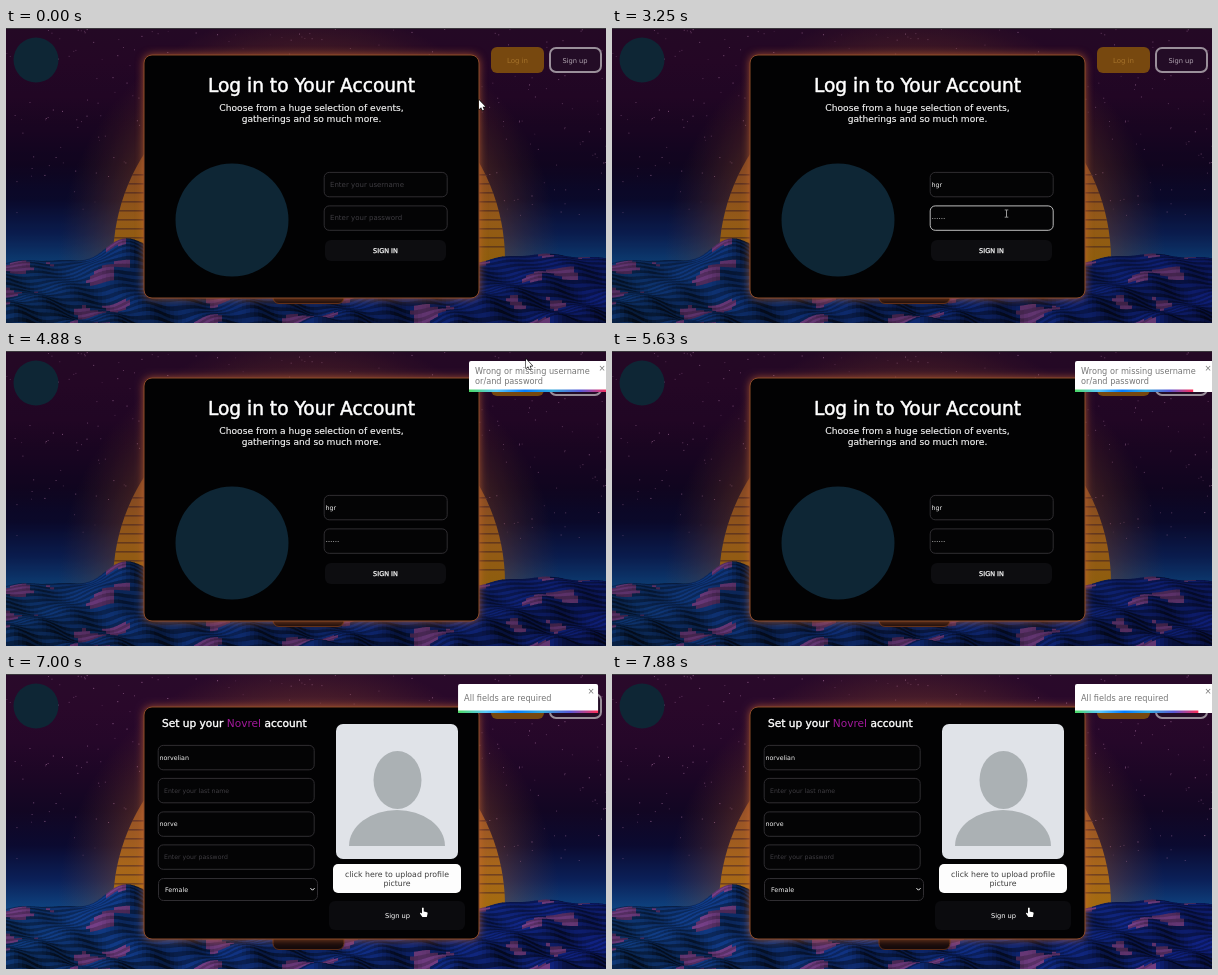
Write an HTML page with a canvas that moves like this. It is 600x295 px and loops after 8000 ms.

```html
<!DOCTYPE html>
<html lang="en">
<head>
<meta charset="utf-8">
<title>Log in and sign up</title>
<style>
html, body { margin: 0; width: 100%; height: 100%; overflow: hidden; background: #16081a; }
canvas { display: block; width: 600px; height: 295px; }
</style>
</head>
<body>
<canvas id="stage"></canvas>
<script>
const W = 600, H = 295, LOOP = 8000, STEP = 125;
const SIGNUP_AT = 5750;
const PX = 0.4375; // page zoom
const FONT = '"DejaVu Sans", sans-serif';
const LOGO = '#0e2635';
const dpr = window.devicePixelRatio || 1;

function makeLayer(canvas) {
  canvas.width = W * dpr;
  canvas.height = H * dpr;
  const context = canvas.getContext('2d');
  context.scale(dpr, dpr);
  return context;
}

const stage = document.getElementById('stage');
const ctx = makeLayer(stage);

function box(c, x, y, w, h, r, fill, stroke, line = 1) {
  c.beginPath();
  c.roundRect(x, y, w, h, r);
  if (fill) { c.fillStyle = fill; c.fill(); }
  if (stroke) { c.strokeStyle = stroke; c.lineWidth = line; c.stroke(); }
}

function disc(c, x, y, r, fill) {
  c.fillStyle = fill;
  c.beginPath();
  c.arc(x, y, r, 0, 7);
  c.fill();
}

// Draws text, thickened by `bold` pixels, and returns its width.
function text(str, x, y, size, color, align = 'left', bold = 0) {
  ctx.font = `${size}px ${FONT}`;
  ctx.fillStyle = ctx.strokeStyle = color;
  ctx.textAlign = align;
  ctx.fillText(str, x, y);
  if (bold) {
    ctx.lineWidth = bold;
    ctx.lineJoin = 'round';
    ctx.strokeText(str, x, y);
  }
  return ctx.measureText(str).width;
}

function gradient(c, x0, y0, x1, y1, colors) {
  const g = c.createLinearGradient(x0, y0, x1, y1);
  colors.forEach((color, i) => g.addColorStop(i / (colors.length - 1), color));
  return g;
}

function seeded(seed) {
  return () => (seed = (seed * 16807) % 2147483647) / 2147483647;
}

// --- Backdrop ---

const SUN = { x: 303, y: 232, r: 196 };

function drawSky(c) {
  c.fillStyle = gradient(c, 0, 0, 0, 240,
    ['#290a2a', '#29082a', '#250729', '#1c0625', '#120623', '#0b0a30', '#0b2058', '#0f4a88']);
  c.fillRect(0, 0, W, H);
  const rand = seeded(77);
  for (let i = 0; i < 330; i++) {
    const x = rand() * W, y = rand() * 195, a = 0.2 + rand() * 0.5;
    c.fillStyle = `rgba(190,130,180,${a})`;
    c.fillRect(x, y, 1, 1);
  }
}

function drawSun(c) {
  const { x, y, r } = SUN;
  const glow = c.createRadialGradient(x, y, r - 10, x, y, r + 55);
  glow.addColorStop(0, 'rgba(170,90,40,0.4)');
  glow.addColorStop(1, 'rgba(120,60,40,0)');
  c.fillStyle = glow;
  c.fillRect(0, 0, W, H);
  c.save();
  c.beginPath();
  c.arc(x, y, r, 0, 7);
  c.clip();
  c.fillStyle = gradient(c, 0, 36, 0, 245, ['#3a1c18', '#5c2f1c', '#965226', '#a8661a', '#a06c0c']);
  c.fillRect(x - r, 0, r * 2, H);
  c.fillStyle = 'rgba(50,22,40,0.45)';
  for (let i = 0; i < 9; i++) c.fillRect(x - r, 146 + i * 9, r * 2, 1.6);
  c.restore();
}

const hill = (x, center, width) => Math.exp(-(((x - center) / width) ** 2));

function ground(x, d) {
  const wave = Math.sin(x * 0.055 + d * 9) * 3 + Math.sin(x * 0.13 - d * 14) * 1.6 + Math.sin(x * 0.025 - d * 6) * 3;
  const ridge = 24 * hill(x, 122, 32) + 9 * hill(x, 535, 45);
  return 235 + 66 * d ** 1.25 - ridge * (1 - d) ** 2 - wave * (0.6 + d);
}

function drawTerrain(c) {
  const rows = 34, dx = 4;
  for (let j = 0; j < rows; j++) {
    const d = j / rows;
    for (let x = 0; x < W; x += dx) {
      const top = ground(x, d), next = ground(x + dx, d);
      const slope = Math.max(-1, Math.min(1, (next - top) / 1.6));
      const pink = Math.sin(x * 0.037 + d * 11) * Math.sin(x * 0.021 - d * 8 + 2) > 0.42 && slope < 0.1;
      const light = 20 - slope * 7 + (j % 2 ? 4 : -4) - d * 3;
      c.fillStyle = pink ? `hsl(285,36%,${light + 9}%)` : `hsl(${216 + x / 40},78%,${light}%)`;
      c.beginPath();
      c.moveTo(x, top);
      c.lineTo(x + dx + 0.5, next);
      c.lineTo(x + dx + 0.5, H);
      c.lineTo(x, H);
      c.fill();
    }
  }
}

function drawBackdrop(c) {
  drawSky(c);
  drawSun(c);
  drawTerrain(c);
  c.fillStyle = '#39353b';
  c.fillRect(0, 0, W, 1);
}

const backdrop = document.createElement('canvas');
drawBackdrop(makeLayer(backdrop));

// --- Page parts ---

function drawHeader() {
  disc(ctx, 30, 32, 22.5, LOGO);
  box(ctx, 485, 19, 53, 26, 6, '#77480f');
  text('Log in', 511.5, 34.5, 7, '#a5722a', 'center');
  box(ctx, 544, 20, 51, 24, 6, '#230c26', '#9a8f9a', 2);
  text('Sign up', 569, 34.5, 6.7, '#b0a4b0', 'center');
}

function drawCard(y, h) {
  box(ctx, 267, 255, 71, 20.5, 6, '#120809', '#5a2c16');
  ctx.save();
  ctx.shadowColor = 'rgba(215,108,48,0.75)';
  ctx.shadowBlur = 9 * dpr;
  box(ctx, 138, y, 335, h, 8, '#020203');
  ctx.restore();
  box(ctx, 138, y, 335, h, 8, null, '#8a4a28');
}

function field(x, y, w, hint, value, focused) {
  box(ctx, x + 0.2, y + 0.4, w, 24.4, 5, '#040405', focused ? '#bcbcbc' : '#2f2d31');
  if (value) text(value, x + 1.5, y + 14.5, 6.3, '#f2f2f2');
  else if (hint) text(hint.label, x + 6, y + 14.8, hint.size, '#3f3d42');
}

function typedCount(t, times) {
  return times.filter(at => t >= at).length;
}

function drawLogin(t) {
  ctx.fillStyle = 'rgba(0,0,0,0.12)';
  ctx.fillRect(0, 1, W, H);
  drawHeader();
  drawCard(27, 243);
  text('Log in to Your Account', 305.5, 64.3, 18.6, '#fff', 'center', 0.5);
  text('Choose from a huge selection of events,', 305.5, 83, 9.15, '#f4f4f4', 'center', 0.15);
  text('gatherings and so much more.', 305.5, 94, 9.1, '#f4f4f4', 'center', 0.15);
  disc(ctx, 226, 192, 56.5, LOGO);

  const name = 'hgr'.slice(0, typedCount(t, [1125, 1625, 1750]));
  const dots = typedCount(t, [2375, 2375, 2625, 2625, 2750, 3250]);
  const onName = t >= 625 && t < 2000;
  const onPass = t >= 2000 && t < 3750;
  field(318, 144, 123, { label: 'Enter your username', size: 7 }, name, onName);
  if (onName && name) {
    ctx.fillRect(320.5 + ctx.measureText(name).width, 153, 0.8, 7);
  }
  field(318, 177.5, 123, dots ? null : { label: 'Enter your password', size: 7 }, '', onPass);
  for (let i = 0; i < dots; i++) disc(ctx, 320.7 + i * 2.3, 190.5, 0.55, '#b0b0b0');

  box(ctx, 319, 212, 121, 21, 6, '#0d0d10');
  text('SIGN IN', 379.5, 225, 6.5, '#fff', 'center', 0.25);
}

function drawAvatar() {
  box(ctx, 330, 50, 122, 135, 7, '#e0e3e8');
  ctx.fillStyle = '#abb1b4';
  ctx.beginPath();
  ctx.ellipse(391.5, 106, 24, 29, 0, 0, 7);
  ctx.fill();
  ctx.beginPath();
  ctx.ellipse(391, 172, 48, 36, 0, Math.PI, 2 * Math.PI);
  ctx.fill();
}

function drawSignup() {
  drawHeader();
  drawCard(33, 232);
  let x = 156;
  x += text('Set up your ', x, 53, 10.6, '#fff', 'left', 0.4);
  x += text('Novrel', x, 53, 10.6, '#a3199c');
  text(' account', x, 53, 10.6, '#fff', 'left', 0.4);

  field(152, 71, 156, null, 'norvelian');
  field(152, 104, 156, { label: 'Enter your last name', size: 6.2 });
  field(152, 137.5, 156, null, 'norve');
  field(152, 170.5, 156, { label: 'Enter your password', size: 6.2 });
  box(ctx, 152.5, 204.5, 159, 22, 5, '#040405', '#2f2d31');
  text('Female', 159, 218, 6.4, '#f2f2f2');
  ctx.strokeStyle = '#fff';
  ctx.lineWidth = 1;
  ctx.beginPath();
  ctx.moveTo(304.5, 214.2);
  ctx.lineTo(306.5, 216.2);
  ctx.lineTo(308.5, 214.2);
  ctx.stroke();

  drawAvatar();
  box(ctx, 327, 190, 128, 29, 5, '#fdfdfd');
  text('click here to upload profile', 391, 202.5, 7.8, '#3c3c3c', 'center');
  text('picture', 391, 211.5, 7.8, '#3c3c3c', 'center');
  box(ctx, 323, 227, 136, 29, 6, '#0b0b0e');
  text('Sign up', 391.5, 243.5, 6.7, '#fff', 'center');
}

// --- Toast ---

const RAINBOW = ['#4cd964', '#5ac8fa', '#007aff', '#34aadc', '#5856d6', '#ff2d55'];
const BOUNCE = [[0, 3000], [0.6, -25], [0.75, 10], [0.9, -5], [1, 0]];
const easeOut = p => 1 - (1 - p) ** 3;

function bounceIn(p) {
  if (p >= 1) return 0;
  const i = BOUNCE.findIndex(key => key[0] > p);
  const [p0, v0] = BOUNCE[i - 1], [p1, v1] = BOUNCE[i];
  return (v0 + (v1 - v0) * easeOut((p - p0) / (p1 - p0))) * PX;
}

function drawToast(age, lines, h) {
  if (age < 0) return;
  const enter = 700, life = 5000, w = 140, y = 10;
  const x = 463 + bounceIn(age / enter);
  if (x > W) return;
  box(ctx, x, y, w, h, 2, '#fff');
  const first = y + h / 2 + 2.3 - (lines.length - 1) * 4.7;
  lines.forEach((line, i) => text(line, x + 6, first + i * 9.4, 8.2, '#777'));
  text('×', x + w - 7, y + 9.5, 8.5, '#777', 'center');
  const left = w * (1 - Math.max(0, age - enter) / life);
  ctx.fillStyle = gradient(ctx, x, 0, x + left, 0, RAINBOW);
  ctx.fillRect(x, y + h - 2.5, left, 2.5);
}

// --- Pointer ---

const PATH = [
  [0, 473, 72], [125, 432, 145], [250, 432, 145], [375, 412, 152], [625, 400, 158],
  [875, 394.5, 185.5], [3250, 394.5, 185.5], [3750, 394, 222], [4125, 400, 221],
  [4250, 440, 150], [4375, 476.5, 81], [4625, 508, 36], [4875, 520, 8], [5000, 522, -14],
  [5625, 522, -14], [5750, 478, 99], [6000, 446, 165], [6375, 416, 234], [8000, 416, 234]
];

function pointerAt(t) {
  const i = Math.max(1, PATH.findIndex(key => key[0] > t));
  const [t0, x0, y0] = PATH[i - 1], [t1, x1, y1] = PATH[i];
  const p = (t - t0) / (t1 - t0);
  return [x0 + (x1 - x0) * p, y0 + (y1 - y0) * p];
}

const ARROW = new Path2D('M0 0V9.2L2.1 7.3 3.5 10.3 4.9 9.7 3.6 6.8H6.4Z');
const HAND = new Path2D('M0 0Q1-1 1.7 0V3.4L5 4.2Q5.8 4.5 5.6 5.5L4.8 9H.4L-2 5.6Q-2.2 4.6-1.2 4.7L0 5.6Z');

function pointerKind(t, x, y) {
  const inside = (x0, y0, x1, y1) => x > x0 && x < x1 && y > y0 && y < y1;
  if (t >= SIGNUP_AT) return inside(323, 189, 459, 256) ? 'hand' : 'arrow';
  if (inside(318, 212, 441, 234)) return 'hand';
  return inside(318, 144, 441, 203) ? 'beam' : 'arrow';
}

function drawPointer(t) {
  const [x, y] = pointerAt(t);
  const kind = pointerKind(t, x, y);
  ctx.save();
  ctx.translate(x, y);
  if (kind === 'beam') {
    ctx.fillStyle = '#9a9a9a';
    ctx.fillRect(-0.5, -3.5, 1, 7);
    ctx.fillRect(-1.8, -4, 3.6, 0.9);
    ctx.fillRect(-1.8, 3.2, 3.6, 0.9);
  } else {
    const shape = kind === 'hand' ? HAND : ARROW;
    ctx.strokeStyle = '#111';
    ctx.lineWidth = 1.2;
    ctx.stroke(shape);
    ctx.fillStyle = '#fff';
    ctx.fill(shape);
  }
  ctx.restore();
}

function draw(now) {
  const t = Math.floor(((now % LOOP) + 5) / STEP) * STEP % LOOP;
  ctx.drawImage(backdrop, 0, 0, W, H);
  if (t < SIGNUP_AT) {
    drawLogin(t);
    drawToast(t - 4146, ['Wrong or missing username', 'or/and password'], 31);
  } else {
    drawSignup();
    drawToast(t - 6580, ['All fields are required'], 29);
  }
  drawPointer(t);
}

const start = performance.now();
function tick() {
  draw(performance.now() - start);
  requestAnimationFrame(tick);
}
tick();
</script>
</body>
</html>
```
